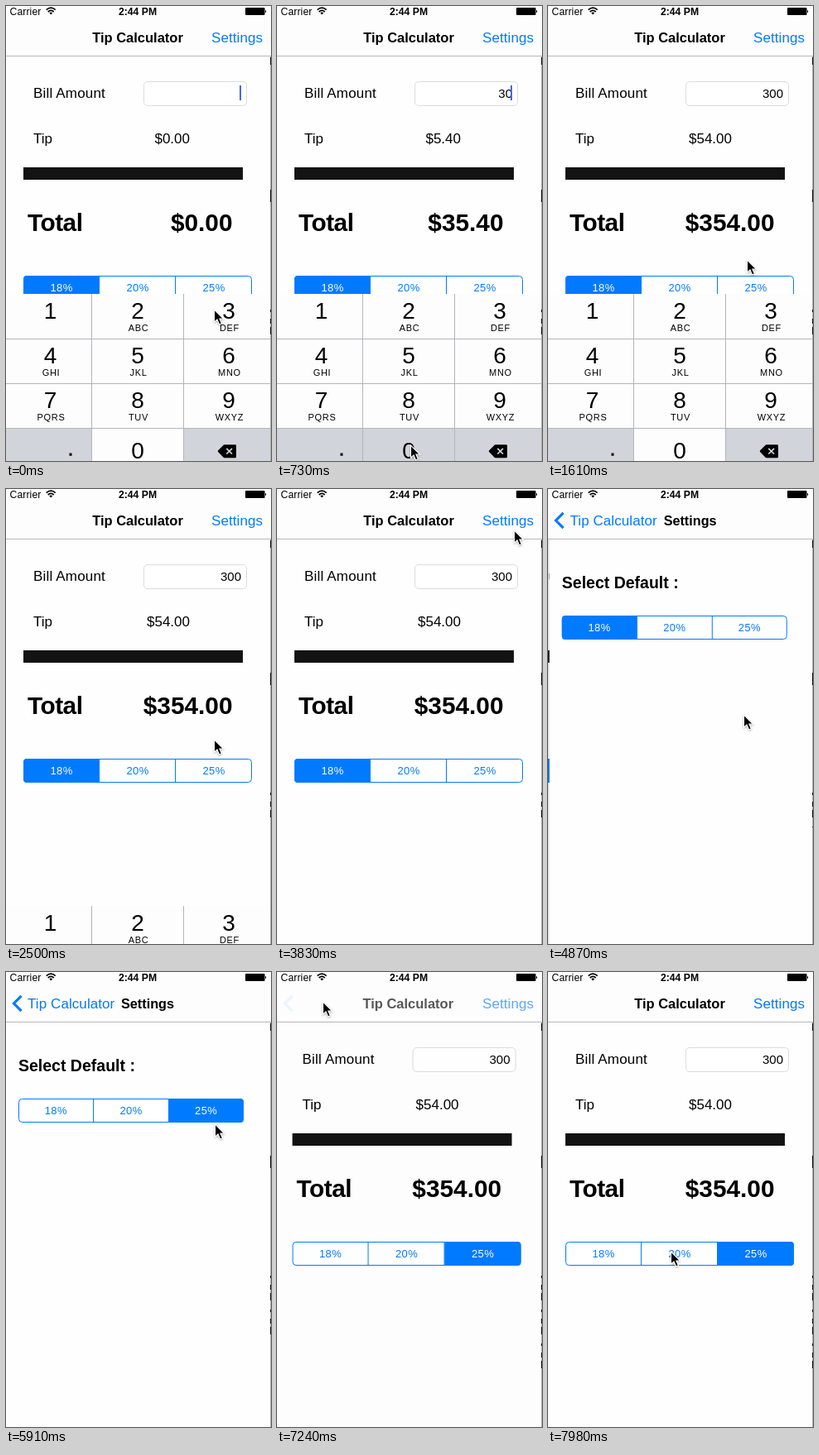
An HTML page that plays this animation: 320 by 550 pixels, repeating every 8 s.

```html
<!DOCTYPE html>
<html lang="en">
<head>
<meta charset="utf-8">
<title>Tip Calculator</title>
<style>
html, body { margin: 0; width: 100%; height: 100%; overflow: hidden; background: #fefefe; }
svg { display: block; width: 320px; height: 550px; font: 17px "Liberation Sans", Arial, sans-serif; }
.bold { font-weight: 700; }
.blue { fill: #007aff; }
.mid { text-anchor: middle; }
.end { text-anchor: end; }
.nav { font-size: 16.5px; }
.status { font-size: 12.2px; }
.total { font-size: 29.8px; }
.seg { font-size: 13px; letter-spacing: .4px; text-anchor: middle; }
.digit { font-size: 28px; text-anchor: middle; }
.letters { font-size: 11px; letter-spacing: .7px; text-anchor: middle; }
#cursor { filter: drop-shadow(0 1px 1px rgba(0, 0, 0, .3)); }
</style>
</head>
<body>
<svg viewBox="0 0 320 550">
  <rect width="320" height="550" fill="#fefefe"/>

  <g id="home">
    <text x="33" y="111" letter-spacing=".18">Bill Amount</text>
    <rect x="166.5" y="91.5" width="124" height="29" rx="4.5" fill="#fff" stroke="#dcdcdc"/>
    <text id="bill" class="end" x="284" y="111" font-size="15"></text>
    <rect id="caret" x="282" y="96" width="2" height="18" fill="#4468e8"/>
    <text x="33" y="166">Tip</text>
    <text id="tip" class="end" x="222" y="165.5"></text>
    <rect x="21" y="195" width="265" height="15" fill="#131313"/>
    <text class="bold total" x="26" y="271.5" letter-spacing="-.5">Total</text>
    <text id="total" class="bold total end" x="273.5" y="271.5"></text>
    <g id="homeSeg" transform="translate(21 326)"></g>
  </g>
  <rect id="dim" width="320" height="550" opacity="0"/>

  <g id="settings">
    <rect width="320" height="550" fill="#fefefe"/>
    <text class="bold" x="15" y="120" font-size="19.5">Select Default :</text>
    <g id="setSeg" transform="translate(15 153)"></g>
  </g>

  <rect width="320" height="60" fill="#fdfdfd"/>
  <rect y="60" width="320" height="1" fill="#b8b8ba"/>
  <g id="homeTitle"><text class="bold nav mid" x="159" y="44">Tip Calculator</text></g>
  <text id="setBtn" class="blue" x="248" y="44" letter-spacing=".08">Settings</text>
  <g id="backBtn">
    <path d="M18.5 28.8L9.5 38L18.5 47.2" fill="none" stroke="#007aff" stroke-width="3.2"/>
    <text id="backLabel" class="blue" x="26" y="44" letter-spacing=".08">Tip Calculator</text>
  </g>
  <g id="setTitle"><text class="bold mid" x="171" y="44" font-size="16.2">Settings</text></g>

  <text class="status" x="4.5" y="10.8" letter-spacing=".1">Carrier</text>
  <g fill="none" stroke="#000" stroke-width="1.7">
    <path d="M48.7 4.6Q54.2 -.4 59.7 4.6M50.7 7Q54.2 3.8 57.7 7"/>
    <path d="M52.3 8.3Q54.2 6.7 56.1 8.3L54.2 10.6Z" fill="#000" stroke="none"/>
  </g>
  <text class="status bold mid" x="159" y="10.8">2:44 PM</text>
  <rect x="289" y="2" width="23.5" height="9" rx="1"/>
  <path d="M313 4.7Q315.4 6.5 313 8.3Z"/>

  <g id="keys"></g>
  <rect x="319" y="61" width="1" height="489" fill="#b4b4b6"/>
  <g stroke="#111">
    <path d="M319.5 62v9M319.5 222v15"/>
    <line id="edge" x1="319.5" y1="367" x2="319.5" stroke-dasharray="3 8 6 4 9 11"/>
  </g>

  <g id="cursor">
    <path d="M.5 0V15.2L4 12L6.6 18L9.4 16.8L6.9 11H11.6Z" stroke="#fff" stroke-width="1.1"/>
  </g>
</svg>

<script>
const LOOP = 8000, TICK = 147.9, LEAD = 22;
const DISMISS = 2328, OPEN = 4387, PICK = 5580, BACK = 6867;
const PRESSES = [120, 710, 1010], TYPED = '300', BLUE = '#007aff', GREY = '#d1d4db';

const $ = id => document.getElementById(id);
const clamp = v => Math.max(0, Math.min(1, v));
const ease = v => v * v * (3 - 2 * v);
const move = (id, x, y = 0) => $(id).setAttribute('transform', `translate(${x.toFixed(2)} ${y.toFixed(2)})`);
const fade = (id, a) => $(id).setAttribute('opacity', Number(a).toFixed(3));
const rect = (x, y, w, h, fill, extra = '') =>
  `<rect x="${x}" y="${y}" width="${w}" height="${h}" fill="${fill}" ${extra}/>`;
const label = (cls, x, y, s, extra = '') => `<text class="${cls}" x="${x}" y="${y}" ${extra}>${s}</text>`;

// Remaining distance of a critically damped spring after ms
const spring = ms => {
  const a = Math.max(0, ms) * .0155;
  return (1 + a) * Math.exp(-a);
};

// Pointer trips: arrival time, duration, x, y
const trips = [
  [420, 300, 161, 531], [1600, 420, 240, 307], [1750, 100, 251, 303], [2780, 200, 245, 339],
  [3800, 560, 286, 50], [4855, 400, 236, 273], [5440, 400, 246, 170], [5880, 250, 252, 184],
  [6770, 560, 55, 36], [7960, 600, 148, 338]
];
function pointer(t) {
  let x = 251, y = 367;
  for (const [end, span, u, v] of trips) {
    const f = ease(clamp((t - end + span) / span));
    x += (u - x) * f;
    y += (v - y) * f;
  }
  return [x, y];
}

function segments(id, w, picked) {
  const c = w / 3;
  let s = rect(.5, .5, w - 1, 28, '#fff', `rx="4" stroke="${BLUE}"`);
  s += rect(c * picked, 0, c, 29, BLUE, 'rx="4"');
  s += rect(c * (picked ? picked : .5), 0, c / 2, 29, BLUE);
  for (const n of [1, 2]) s += rect(Math.ceil(n * c) - 1, 1, 1, 27, BLUE);
  ['18%', '20%', '25%'].forEach((name, n) => {
    s += label('seg', (n + .5) * c, 19, name, `fill="${n === picked ? '#fff' : BLUE}"`);
  });
  $(id).innerHTML = s;
}

function buildKeys() {
  const line = '#b4b5b9', mids = [53.5, 159, 269];
  let s = rect(0, 348, 320, 220, '#fdfdfd');
  s += rect(0, 511, 103, 57, GREY) + rect(215, 511, 105, 57, GREY);
  s += rect(215, 348, 104, 54, GREY, 'id="key3"') + rect(104, 511, 110, 57, GREY, 'id="key0"');
  for (const y of [402, 456, 510]) s += rect(0, y, 320, 1, line);
  for (const x of [103, 214]) s += rect(x, 348, 1, 220, line);
  ',ABC,DEF,GHI,JKL,MNO,PQRS,TUV,WXYZ'.split(',').forEach((name, i) => {
    const x = mids[i % 3], y = 378 + 54 * Math.floor(i / 3);
    s += label('digit', x, y, i + 1) + label('letters', x + 1, y + 15, name);
  });
  s += label('digit', 159, 547, 0) + rect(76.5, 540.5, 3, 3.2, '#000');
  s += '<path d="M257 538.2L263.5 531.5H276.8V545H263.5Z" stroke="#000" stroke-width="2.4" stroke-linejoin="round"/>';
  s += `<path d="M266.3 534.8l6.7 6.7m0 -6.7l-6.7 6.7" stroke="${GREY}" stroke-width="1.7"/>`;
  $('keys').innerHTML = s;
}

function drawKeyboard(t) {
  const typed = PRESSES.filter(p => t >= p).length;
  const held = typed && t - PRESSES[typed - 1] < TICK - 10;
  const text = TYPED.slice(0, typed), bill = Number(text);
  const blinkOff = t > 1400 && Math.floor((t - 1400) / 350) % 2 === 0;
  $('bill').textContent = text;
  $('tip').textContent = '$' + (bill * .18).toFixed(2);
  $('total').textContent = '$' + (bill * 1.18).toFixed(2);
  fade('caret', t < DISMISS && !blinkOff);
  fade('key3', held && typed === 1);
  fade('key0', held && typed > 1);
  move('keys', 0, 216 * (1 - spring(t - DISMISS)));
}

function drawPages(t) {
  const back = t >= BACK, since = t - (back ? BACK : OPEN);
  const p = back ? spring(since) : 1 - spring(since);
  const rise = clamp((since - 150) / 320), fall = clamp(1 - since / 385);
  const pressed = start => t >= start - 200 && t < start ? .3 : 1;
  move('home', -96 * p);
  move('settings', 320 * (1 - p));
  fade('dim', .1 * p);
  move('homeTitle', -30 * p);
  fade('homeTitle', back ? rise : fall);
  fade('setBtn', (back ? rise : fall) * pressed(OPEN));
  move('backLabel', 80 * (1 - p));
  fade('backLabel', back ? clamp(1 - since / 250) : 1);
  fade('backBtn', (back ? fall : rise) * pressed(BACK));
  move('setTitle', 110 * (1 - p));
  fade('setTitle', back ? clamp(1 - since / 300) : rise);
}

function draw(t) {
  const picked = t < PICK ? 0 : 2;
  drawKeyboard(t);
  drawPages(t);
  segments('homeSeg', 276, picked);
  segments('setSeg', 272, picked);
  $('edge').setAttribute('y2', 398 + 90 * clamp((t - 4500) / 3000));
  move('cursor', ...pointer(t));
}

buildKeys();
const start = performance.now();
let shown = -1;
function loop() {
  const k = Math.floor(((performance.now() - start) % LOOP + LEAD) / TICK);
  if (k !== shown) draw(Math.max(0, k * TICK - LEAD));
  shown = k;
  requestAnimationFrame(loop);
}
loop();
</script>
</body>
</html>
```
